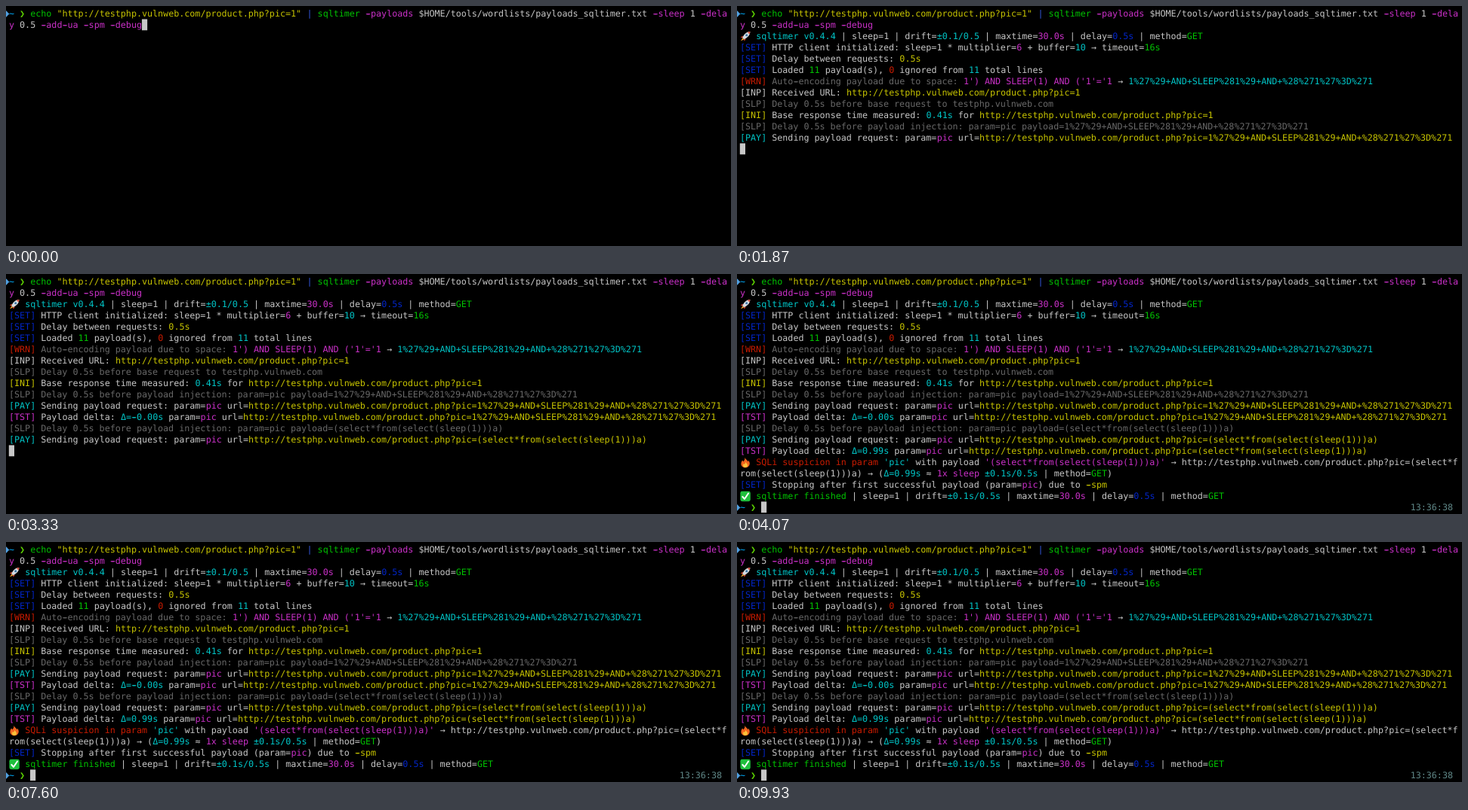
Write an HTML page that moves like this. It is 960x319 px and loops after 10 s.

```html
<!DOCTYPE html>
<html lang="en">
<head>
<meta charset="utf-8">
<title>Terminal session</title>
<style>
  html, body { margin: 0; width: 100%; height: 100%; overflow: hidden; background: #000; }
  svg { display: block; width: 960px; height: 319px; }
  text {
    font: 11.7px "DejaVu Sans Mono", "Noto Sans Mono", monospace;
    white-space: pre;
    text-rendering: geometricPrecision;
  }
</style>
</head>
<body>
<svg id="stage" viewBox="0 0 960 319" xmlns="http://www.w3.org/2000/svg">
  <defs>
    <path id="mark" d="M0 2.5 L4.3 7 L0 11.5 Z" fill="#4f9fe0"/>
    <g id="rocket">
      <path d="M3.5 6 L0.8 8.5 L4 9 Z M8 10 L5.6 13.4 L5 10 Z" fill="#d8402c"/>
      <path d="M3.5 9 L1 13.2 L5.4 10.8 Z" fill="#f2a32c"/>
      <path d="M13.4 0.6 C9 0.6 5.5 3.6 3.2 8.6 L5.4 10.8 C10.4 8.5 13.4 5 13.4 0.6 Z" fill="#d5dbe0"/>
      <path d="M13.4 0.6 L9.8 1.4 L12.6 4.2 Z" fill="#d8402c"/>
      <circle cx="8.7" cy="5.3" r="1.5" fill="#3b75a8"/>
    </g>
    <g id="fire">
      <path d="M6.4 0.3 C7 3 10 4 10.4 6 C11 5.4 11 4.6 10.8 4 C13 6.2 13.4 9 12 11.3 C10.8 13.4 8.6 14 7 14 C4 14 1.4 12 1.4 9 C1.4 6.8 2.6 5.6 3 4.2 C3.8 4.8 4 5.4 4.2 6 C6 4.4 6.6 2.6 6.4 0.3 Z" fill="#f0641e"/>
      <path d="M7.4 6 C7.6 8 10.2 8.8 10 11 C9.8 13 8.4 13.7 7 13.7 C5.2 13.7 3.9 12.5 4 10.8 C4 9.8 4.6 9.2 4.8 8.6 L5.7 9.6 C6.8 8.6 7.4 7.6 7.4 6 Z" fill="#fdc33a"/>
    </g>
    <g id="check">
      <rect x="0.4" y="0.4" width="13.4" height="13.4" rx="2.4" fill="#1fbf3c"/>
      <path d="M3.3 7.6 L6 10.6 L11 3.2" fill="none" stroke="#fff" stroke-width="1.9"
            stroke-linecap="round" stroke-linejoin="round"/>
    </g>
  </defs>
  <g id="screen"></g>
  <rect id="cursor" width="7.2" height="14.8" fill="#c7c7c7"/>
</svg>
<script>
const LOOP = 10000, LEFT = 4, TOP = 3, CELL = 7.045, LINE = 15, BASE = 11;

const COLORS = {
  w: '#c7c7c7', k: '#686868', r: '#c91b00', g: '#00c200', y: '#c7c400',
  b: '#0225c7', m: '#c930c7', c: '#00c5c7',
  d: '#00afff', p: '#5fd700', t: '#5f8787', s: '#3358e0'
};

const url = 'http://testphp.vulnweb.com/product.php?pic=';
const quoted = "1%27%29+AND+SLEEP%281%29+AND+%28%271%27%3D%271";
const nested = '(select*from(select(sleep(1)))a)';

const prompt = '^d~ ^p❯ ';
const slept = what => `^k[SLP] Delay 0.5s before ${what}`;
const injecting = payload => slept('payload injection: param=pic payload=' + payload);
const sent = payload => `^c[PAY]^w Sending payload request: param=^mpic^w url=^y${url}${payload}`;
const tested = (delta, payload) =>
  `^m[TST]^w Payload delta: ^cΔ=${delta}s^w param=^mpic^w url=^y${url}${payload}`;
const settings = drift =>
  `^w | sleep=1 | drift=^c${drift}^w | maxtime=^m30.0s^w | delay=^b0.5s^w | method=^gGET`;

// "^x" switches to colour x
const rows = [
  `${prompt}^gecho ^y"${url}1" ^s| ^gsqltimer ^m-payloads ^w$HOME/tools/wordlists/payloads_sqltimer.txt ^m-sleep ^w1 ^m-dela`,
  '^my ^w0.5 ^m-add-ua -spm -debug',
  '^w   ^csqltimer v0.4.4' + settings('±0.1/0.5'),
  '^b[SET]^w HTTP client initialized: sleep=1 * multiplier=^m6^w + buffer=^c10^w → timeout=^g16s',
  '^b[SET]^w Delay between requests: ^y0.5s',
  '^b[SET]^w Loaded ^g11^w payload(s), ^r0^w ignored from ^c11^w total lines',
  `^r[WRN]^k Auto-encoding payload due to space: ^m1') AND SLEEP(1) AND ('1'='1^w → ^c${quoted}`,
  `^w[INP] Received URL: ^y${url}1`,
  slept('base request to testphp.vulnweb.com'),
  `^y[INI]^w Base response time measured: ^c0.41s^w for ^y${url}1`,
  injecting(quoted),
  sent(quoted),
  tested('-0.00', quoted),
  injecting(nested),
  sent(nested),
  tested('0.99', nested),
  `^w   ^rSQLi suspicion in param ^c'pic'^w with payload ^m'${nested}'^w → ${url}${nested.slice(0, 9)}`,
  `^w${nested.slice(9)} → (^cΔ=0.99s^w ≈ ^m1x sleep ^c±0.1s/0.5s^w | method=^gGET^w)`,
  '^b[SET]^w Stopping after first successful payload (param=^mpic^w) due to ^y-spm',
  '^w   ^gsqltimer finished' + settings('±0.1s/0.5s'),
  prompt + '^w' + ' '.repeat(122) + '^t13:36:38'
];
const icons = { 0: ['mark', 0], 2: ['rocket', LEFT], 16: ['fire', LEFT], 19: ['check', LEFT], 20: ['mark', 0] };

// start time, visible rows, cursor row, cursor column
const stages = [
  [0, 2, 1, 25],
  [670, 9, 9, 0],
  [1430, 11, 11, 0],
  [1840, 12, 12, 0],
  [2190, 14, 14, 0],
  [2600, 15, 15, 0],
  [3770, 21, 20, 4]
];

const screen = document.getElementById('screen');
const cursor = document.getElementById('cursor');

function add(parent, tag, attrs, content = '') {
  const node = document.createElementNS('http://www.w3.org/2000/svg', tag);
  for (const key in attrs) node.setAttribute(key, attrs[key]);
  node.textContent = content;
  return parent.appendChild(node);
}

function buildRow(line, index) {
  const group = add(screen, 'g', {});
  const top = TOP + index * LINE;
  let column = 0;
  for (const run of line.split('^').slice(1)) {
    const fill = COLORS[run[0]];
    const chars = run.slice(1);
    if (chars.trim()) add(group, 'text', { x: LEFT + column * CELL, y: top + BASE, fill }, chars);
    // widen the font's short hyphens
    [...chars].forEach((char, i) => {
      if (char === '-') {
        add(group, 'rect', { x: LEFT + (column + i) * CELL + 0.8, y: top + 7.2, width: 5.5, height: 1.1, fill });
      }
    });
    column += chars.length;
  }
  if (icons[index]) {
    const [name, x] = icons[index];
    add(group, 'use', { href: '#' + name, x, y: top + 0.4 });
  }
  return group;
}

const groups = rows.map(buildRow);

function draw(time) {
  const [, count, row, column] = stages.filter(stage => stage[0] <= time).pop();
  groups.forEach((group, i) => group.setAttribute('display', i < count ? 'inline' : 'none'));
  cursor.setAttribute('x', LEFT + column * CELL - 0.2);
  cursor.setAttribute('y', TOP + row * LINE - 0.5);
}

const start = performance.now();
function tick() {
  draw((performance.now() - start) % LOOP);
  requestAnimationFrame(tick);
}
tick();
</script>
</body>
</html>
```
